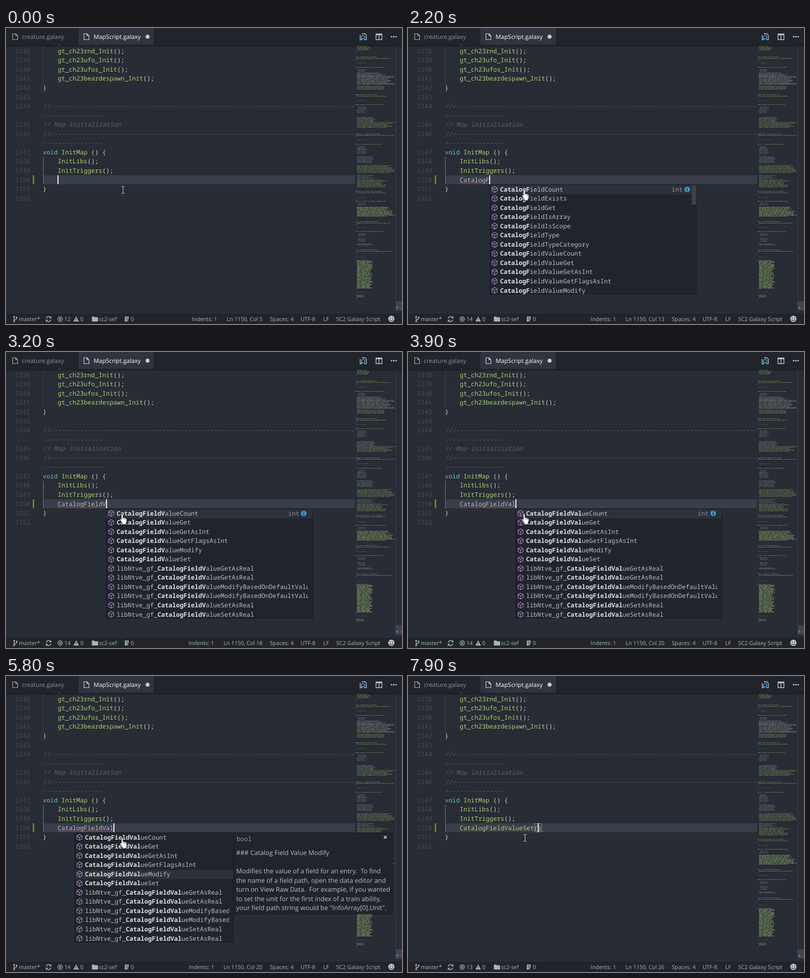
Animation of 800 by 597 pixels, one loop 8000 ms. Source, as an HTML page with a canvas:

```html
<!DOCTYPE html>
<html lang="en">
<head>
<meta charset="utf-8">
<title>Editor completion</title>
<style>
html, body { margin: 0; width: 100%; height: 100%; overflow: hidden; background: #282c34; }
canvas { display: block; width: 800px; height: 597px; }
</style>
</head>
<body>
<canvas id="stage" width="800" height="597"></canvas>
<script>
const LOOP = 8000, W = 800, H = 597;
const CH = 7.5, ROW = 18.56, LEFT = 74.5, INDENT = LEFT + 4 * CH;
const MONO = '12.5px "Noto Sans Mono", "DejaVu Sans Mono", monospace';
const SANS = 'px "Open Sans", "Noto Sans", sans-serif';
const C = {
  bg: '#282c34', panel: '#21252b', tab: '#2f343e', line: '#383e4a', border: '#181a1f',
  text: '#b6bcc7', code: '#cdd1c4', bright: '#dfe2e7', green: '#a8d077', cyan: '#5fc0d0',
  comment: '#5a616e', number: '#454c5a', dots: '#3d434f', red: '#d9423c', blue: '#3f97cc', status: '#abb1bc'
};

const stage = document.getElementById('stage').getContext('2d');
let ctx = stage;

function rect(x, y, w, h, color) { ctx.fillStyle = color; ctx.fillRect(x, y, w, h); }
function mono(s, x, y, color, style = '') {
  ctx.font = style + ' ' + MONO;
  ctx.fillStyle = color;
  ctx.fillText(s, x, y);
  return x + s.length * CH;
}
function sans(s, x, y, color, size) {
  ctx.font = size + SANS;
  ctx.fillStyle = color;
  ctx.fillText(s, x, y);
}
function stroke(d, color, width = 1, x = 0, y = 0) {
  ctx.save();
  ctx.translate(x, y);
  ctx.strokeStyle = color;
  ctx.lineWidth = width;
  ctx.stroke(new Path2D(d));
  ctx.restore();
}
function fill(d, color) {
  ctx.fillStyle = color;
  ctx.fill(new Path2D(d));
}
function disc(x, y, r, color) {
  ctx.fillStyle = color;
  ctx.beginPath();
  ctx.arc(x, y, r, 0, 7);
  ctx.fill();
}
function clipped(x, y, w, h, draw) {
  ctx.save();
  ctx.beginPath();
  ctx.rect(x, y, w, h);
  ctx.clip();
  draw();
  ctx.restore();
}
const base = row => 50.7 + row * ROW;

// ---- still parts ----
function call(row, name) {
  mono('····', LEFT, base(row), C.dots);
  mono('();', mono(name, INDENT, base(row), C.green), base(row), C.code);
}

function drawCode() {
  clipped(0, 34, 705, 541, () => {
    rect(75, 34, 1, 79, '#3b414d');
    ['player', 'rnd', 'ufo', 'ufos', 'beardespawn']
      .forEach((s, i) => call(i - 1, 'gt_ch23' + s + '_Init'));
    mono('}', LEFT, base(4), C.code);
    const dash = '-'.repeat(82), it = 'italic';
    for (const row of [6, 9]) {
      mono('//' + dash, LEFT, base(row), C.comment, it);
      mono(dash.slice(0, 16), LEFT, base(row + 1), C.comment, it);
    }
    mono('// Map Initialization', LEFT, base(8), C.comment, it);
    mono('  ·   ·', LEFT, base(8), C.dots);
    mono('void', LEFT, base(11), C.cyan);
    mono('·', LEFT + 4 * CH, base(11), C.dots);
    mono('InitMap', LEFT + 5 * CH, base(11), C.green);
    mono('() {', LEFT + 13 * CH, base(11), C.code);
    call(12, 'InitLibs');
    call(13, 'InitTriggers');
    mono('}', LEFT, base(15), C.code);
    rect(75, 297, 630, 18, C.line);
    rect(75, 260, 1, 55, '#747c89');
    // wrapped comment rows carry no number
    let n = 1138;
    for (let row = 0; row <= 16; row++)
      if (row !== 7 && row !== 10) mono(String(n++), 18.5, base(row), C.number);
    rect(54, 297, 3, 18, '#5f8f16');
  });
}

function drawMinimap() {
  let seed = 7;
  const rnd = () => (seed = seed * 16807 % 2147483647) / 2147483647;
  const band = (y0, y1, x, w, color, strength = 0.5) => {
    for (let y = y0; y <= y1; y += 2) {
      const end = x + w * (0.72 + rnd() * 0.28);
      let gap = 3 + rnd() * 6;
      for (let px = x; px < end; px++) {
        if (gap-- < 0) { gap = 3 + rnd() * 8; continue; }
        ctx.globalAlpha = strength * (0.5 + rnd() * 0.7);
        rect(px, y, 1, 1, color);
      }
    }
    ctx.globalAlpha = 1;
  };
  const head = (y, w) => { band(y, y, 706, 9, C.cyan, 0.7); band(y, y, 716, w, C.green); };
  const note = y => band(y, y, 708, 23, C.comment, 0.75);

  band(36, 44, 709, 26, C.green);
  band(47, 48, 706, 2, C.text);
  [[58, 70], [134, 146], [213, 225], [329, 342], [390, 402], [447, 462]].forEach(([y, ny]) => {
    head(y, 45);
    band(y + 3, y + 3, 708, 78, C.green, 0.6);
    band(y + 6, y + 6, 706, 2, C.text);
    note(ny);
  });
  [79, 154, 234, 349, 410].forEach(y => {
    head(y, 53);
    band(y + 4, y + 8, 711, 18, C.text, 0.35);
  });
  band(90, 97, 709, 60, C.text);
  band(97, 113, 709, 78, C.code);
  band(117, 124, 709, 62, C.green);
  band(164, 170, 709, 22, C.text, 0.35);
  band(180, 188, 709, 38, C.text);
  band(190, 201, 709, 78, C.green);
  band(243, 254, 709, 20, C.text, 0.35);
  band(259, 271, 709, 38, C.text, 0.4);
  band(277, 291, 709, 78, C.green);
  band(297, 304, 709, 35, C.text, 0.4);
  band(306, 320, 709, 66, C.green);
  band(361, 380, 709, 78, C.green, 0.75);
  band(424, 430, 711, 18, C.text, 0.35);
  band(435, 438, 709, 36, C.text);
  head(468, 20);
  band(470, 524, 709, 32, C.green, 0.85);
  band(526, 526, 706, 2, C.text);
  note(532);
  head(538, 8);
  band(540, 543, 709, 15, C.green, 0.6);
  band(545, 545, 706, 2, C.text);

  rect(787, 35, 1, 541, '#3b414c');
  rect(788, 551, 12, 19, '#3d4552');
  rect(788, 562, 4, 4, '#2f80b5');
}

const PAGE = 'M.5 .5h6l4 4v8h-10z M6.5 .5v4h4';
function drawChrome() {
  rect(0, 0, W, 34, C.panel);
  rect(145, 0, 1, 34, C.border);
  rect(146, 0, 153, 34, C.tab);
  rect(299, 0, 1, 34, C.border);
  const shade = ctx.createLinearGradient(0, 34, 0, 39);
  shade.addColorStop(0, 'rgba(0,0,0,.4)');
  shade.addColorStop(1, 'rgba(0,0,0,0)');
  rect(0, 34, W, 5, shade);
  stroke(PAGE, '#a9afb9', 1.2, 13, 11);
  stroke(PAGE, '#d7dae0', 1.2, 157, 11);
  sans('creature.galaxy', 32, 22, '#8b929f', 12);
  sans('MapScript.galaxy', 177, 22, '#fff', 12);
  disc(286, 17.5, 4, '#c9ccd2');

  stroke('M719 11.5h6l3 3v9h-4 M715.5 14v9.5h4', '#c5c9d0', 1.3);
  stroke('M721.5 18.5m-3.5 0a3.5 3.5 0 1 0 7 0a3.5 3.5 0 1 0 -7 0 M719 21l-4 4', '#4ba3df', 1.6);
  stroke('M747.5 12.5h12v11h-12z M753.5 12v11', '#c5c9d0', 1.4);
  rect(747, 11.5, 13, 3, '#c5c9d0');
  for (const x of [779, 783.5, 788]) disc(x, 17.5, 1.6, '#c5c9d0');

  rect(0, 576, W, 21, C.panel);
  const s = C.status;
  stroke('M16.5 583v8 M21.5 585v1q0 2-5 3', s, 1.4);
  for (const [x, y] of [[16.5, 582.5], [16.5, 591.5], [21.5, 584]]) disc(x, y, 1.7, s);
  stroke('M81.5 586a4.6 4.6 0 0 1 8.5-2 M90.5 588a4.6 4.6 0 0 1-8.5 2', s, 1.5);
  fill('M91.5 581v4.5h-4.5z M80.5 593v-4.5h4.5z', s);
  stroke('M114 587a4.5 4.5 0 1 1-9 0a4.5 4.5 0 1 1 9 0 M107.5 585l4 4 M111.5 585l-4 4', s, 1.3);
  fill('M141.8 581.5l5.5 10.5h-11z', s);
  rect(141.2, 585, 1.2, 3.5, C.panel);
  rect(141.2, 589.6, 1.2, 1.2, C.panel);
  fill('M173.5 582h5l1 1.5h6.5v8.5h-12.5z', s);
  fill('M240 582h8v5l-2.5 5h-5.5z', s);
  stroke('M241.5 584.5h5 M241.5 587h4 M243 592l5-6', C.panel, 1);
  disc(778.5, 586.5, 6.3, '#c3c8d0');
  disc(776.3, 584.8, 1, C.panel);
  disc(780.7, 584.8, 1, C.panel);
  stroke('M774.8 588q3.7 4.5 7.4 0', C.panel, 1.2);
  [['master*', 26], ['0', 150], ['sc2-sef', 188], ['0', 252], ['Spaces: 4', 533],
   ['UTF-8', 595], ['LF', 641], ['SC2 Galaxy Script', 667]]
    .forEach(([text, x]) => sans(text, x, 591, s, 11.1));
}

const still = document.createElement('canvas');
still.width = W;
still.height = H;

// ---- completion list ----
const entries = ['EntryClass', 'EntryCount', 'EntryGet', 'EntryIsDefault', 'EntryIsValid', 'EntryParent',
  'EntryScope', 'FieldCount', 'FieldExists', 'FieldGet', 'FieldIsArray', 'FieldIsScope'];
const fields = [...entries.slice(7), 'FieldType', 'FieldTypeCategory', 'FieldValueCount', 'FieldValueGet',
  'FieldValueGetAsInt', 'FieldValueGetFlagsAsInt', 'FieldValueModify'];
const lib = ['GetAsReal', 'ModifyBasedOnDefaultValue', 'SetAsReal']
  .flatMap(s => Array(2).fill('libNtve_gf_CatalogFieldValue' + s));
const named = list => list.map(s => 'Catalog' + s);
const values = [...named([...fields.slice(7), 'FieldValueSet']), ...lib];
const pickList = n => n < 8 ? named(entries) : n < 13 ? named(fields) : values;

const path = [
  'the name of a field path, open the data editor and', 'turn on View Raw Data.  For example, if you wanted',
  'to set the unit for the first index of a train ability,', 'your field path string would be "InfoArray[0].Unit".'];
const docs = [
  ['int', 'Count', ['Returns the number of values in a field for an entry.']],
  ['string', 'Get', ['Returns the value of a field for an entry.  To find', ...path]],
  ['int', 'Get As Int', ['Returns the value of a field as an integer.  To find', ...path]],
  ['int', 'Get Flags As Int', ['Returns the flags of a field as an integer.  To find', ...path]],
  ['bool', 'Modify', ['Modifies the value of a field for an entry.  To find', ...path]],
  ['bool', 'Set', ['Sets the value of a field for an entry.  To find', ...path]]];

function box(x, y, w, h) {
  rect(x, y, w, h, C.border);
  rect(x + 1, y + 1, w - 2, h - 2, C.panel);
}

function drawList(x, w, list, prefix, pick, withDetail) {
  box(x - 0.5, 316, w, 221.5);
  rect(x + 0.5, 317 + pick * ROW, w - 2, 18.5, '#2c313a');
  clipped(x, 316, w - 10, 221, () => list.forEach((name, i) => {
    const y = 325.4 + i * 18.53, b = y + 4.3;
    stroke('M0-6l5.2 3v6l-5.2 3l-5.2-3v-6z M-5.2-3l5.2 3l5.2-3 M0 0v6', '#ab84c6', 1.1, x + 10, y);
    const at = name.indexOf('Catalog'), end = at + prefix;
    let tx = mono(name.slice(0, at), x + 21, b, C.text);
    tx = mono(name.slice(at, end), tx, b, C.bright, 'bold');
    mono(name.slice(end), tx, b, C.text);
  }));
  if (!withDetail) return;
  mono('int', x + w - 50.5, 329.7, '#858c99');
  disc(x + w - 19, 325.5, 5.6, C.blue);
  rect(x + w - 19.8, 324.5, 1.6, 4.5, C.panel);
  rect(x + w - 19.8, 322, 1.6, 1.6, C.panel);
  if (prefix < 13) rect(x + w - 10, 317, 9, prefix < 8 ? 18 : 39, '#3b404b');
}

function drawDocs(pick) {
  const [type, title, lines] = docs[pick];
  box(459.5, 316, 322, 90 + (lines.length - 1) * 18.6);
  mono(type, 466, 333, '#8f96a3');
  stroke('M763.5 322.5l5.5 5.5 M769 322.5l-5.5 5.5', C.bright, 1.6);
  sans('### Catalog Field Value ' + title, 465, 360.8, C.text, 13);
  lines.forEach((s, i) => sans(s, 465, 398 + i * 18.6, C.text, 13));
}

function drawPointer(overList) {
  if (!overList) {
    const beam = 'M233.5 319.5h2.3l.7.7l.7-.7h2.3 M236.5 320v13 M233.5 333.5h2.3l.7-.7l.7.7h2.3';
    stroke(beam, 'rgba(0,0,0,.4)', 2.2);
    stroke(beam, '#f0f0f0', 1);
    return;
  }
  const hand = 'M233 328q0-2 1.6-2t1.7 2l.2 6q2-1 2.6.7q2-.8 2.5.8q2.4-.5 2.5 2l-.3 4.5l-1.3 3v3h-7.5v-2.5' +
    'l-4.8-7q-.8-2 1-2.1q1.2 0 1.8 1.6z';
  fill(hand, '#fff');
  stroke(hand, '#111', 0.9);
  stroke('M236.5 334v3 M239.1 335v3 M241.6 336v2.5', '#333', 0.7);
}

function squiggle(x0, x1) {
  ctx.strokeStyle = C.red;
  ctx.lineWidth = 1;
  ctx.beginPath();
  for (let x = x0, i = 0; x <= x1; x += 2, i++) ctx.lineTo(x, i % 2 ? 312.5 : 314.7);
  ctx.stroke();
}

// ---- timing ----
const word = 'CatalogFieldVal';
const keys = [100, 700, 900, 1100, 1200, 1300, 1400, 2200, 2400, 2600, 2800, 3000, 3100, 3500, 3800];
const picks = [5000, 5200, 5500, 5800, 6200];
const LIST_AT = 300, DOCS_AT = 4500, ACCEPT_AT = 7100, PAREN_AT = 7500, CHECK_AT = 7700;
const hidden = [[600, 700], [1900, 2200], [4400, 4900], [5900, 6400], [6900, 7100]];
const passed = (times, t) => times.filter(v => t >= v).length;

function draw(t) {
  ctx.drawImage(still, 0, 0);
  const accepted = t >= ACCEPT_AT, paren = t >= PAREN_AT;
  const typed = accepted ? 'CatalogFieldValueSet' : word.slice(0, passed(keys, t));
  const n = typed.length, caret = n + (paren ? 1 : 0), caretX = INDENT + caret * CH;
  const open = t >= LIST_AT && !accepted;

  const endX = mono(typed, INDENT, base(14), accepted ? C.green : C.text);
  if (paren) {
    ctx.strokeStyle = '#888c92';
    ctx.lineWidth = 1;
    for (const i of [0, 1]) {
      rect(endX + i * CH, 297, CH, 18, 'rgba(0,100,0,.1)');
      ctx.strokeRect(Math.round(endX + i * CH) + 0.5, 297.5, 7, 17);
    }
    mono('()', endX, base(14), C.code);
  }
  if (t >= CHECK_AT) squiggle(endX + 2 * CH, endX + 3 * CH);
  else if (t >= 200) squiggle(INDENT, endX);
  if (!hidden.some(([a, b]) => t >= a && t < b)) rect(Math.round(caretX - 0.5), 297, 2, 18, '#f8f8f0');
  if (t >= LIST_AT) rect(796, 562, 4, 4, '#8f3236');

  if (open) {
    const pick = passed(picks, t), showDocs = t >= DOCS_AT;
    // the fourth letter lands before the matches refresh
    const prefix = n === 4 ? 3 : n;
    if (showDocs) {
      drawList(138.5, 322, values, prefix, pick, false);
      drawDocs(pick);
    } else drawList(105 + n * CH, 418, pickList(n), prefix, 0, true);
  }
  drawPointer(open);

  const errors = t < 200 ? 12 : t < CHECK_AT ? 14 : 13;
  const col = 5 + caret, shift = col > 9 ? 6.4 : 0;
  sans(String(errors), 118, 591, C.status, 11.1);
  sans('Indents: 1', 375.5 - shift, 591, C.status, 11.1);
  sans('Ln 1150, Col ' + col, 446 - shift, 591, C.status, 11.1);
}

ctx = still.getContext('2d');
ctx.textRendering = stage.textRendering = 'geometricPrecision';
rect(0, 0, W, H, C.bg);
drawCode();
drawMinimap();
drawChrome();
ctx = stage;

const start = performance.now();
function frame() {
  draw((performance.now() - start) % LOOP);
  requestAnimationFrame(frame);
}
frame();
</script>
</body>
</html>
```
